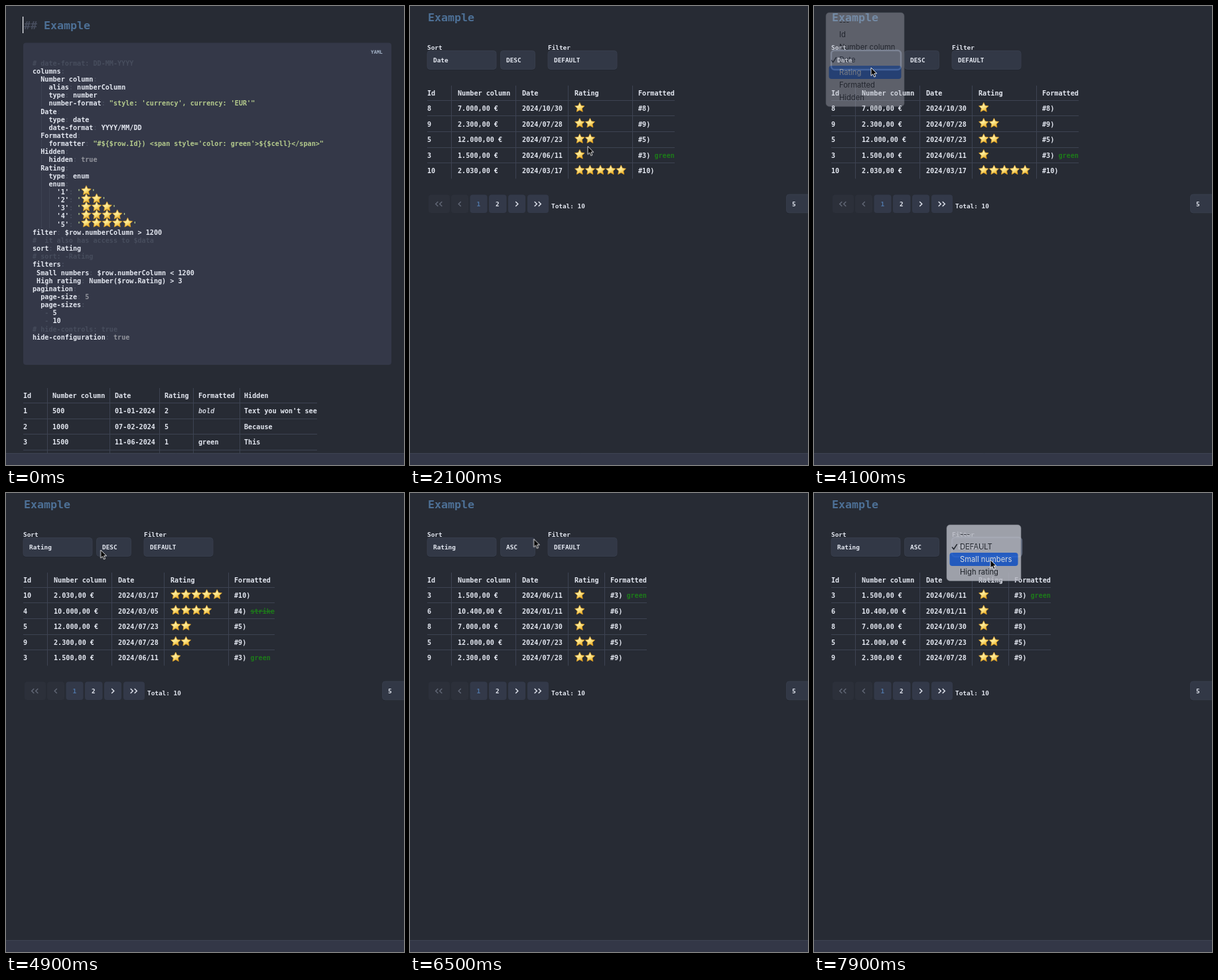
Recreate the animation shown at these times as an HTML page. Size 600x692 px, loop 8 s.

```html
<!DOCTYPE html>
<html lang="en">
<head>
<meta charset="utf-8">
<title>Sortable table demo</title>
<style>
html, body { margin: 0; width: 100%; height: 100%; overflow: hidden; background: #272b34; }
svg { display: block; }
text { white-space: pre; font: bold 10.13px "DejaVu Sans Mono", monospace; fill: #e3e7f0; }
.title { font-size: 16.6px; fill: #4d7096; }
.ui { font-size: 9.4px; }
.tiny { font-size: 7.4px; fill: #a5b4c9; }
.dim { fill: #474d5d; }
.str { fill: #b4ca8c; }
.lit { fill: #92949c; }
.blue { fill: #4f77a8; }
.ok { fill: #1d7a1a; }
.strike { text-decoration: line-through; }
.em { font-style: italic; fill: #c8ccd6; }
.rule { stroke: #3d4352; fill: none; }
.chev { stroke: #e3e7f0; stroke-width: 1.4; fill: none; }
.chev.off { stroke: #626877; }
.menu text { font: 11.2px Inter, "Liberation Sans", sans-serif; fill: #1b1e25; }
.menu .hl text { fill: #fff; }
.menu path { fill: none; stroke: #1b1e25; stroke-width: 1.5; }
.menu .hl path { stroke: #fff; }
.timed { animation: 8s linear infinite; opacity: 0; }
#pointer { animation: glide 8s ease-in-out infinite; }
@keyframes glide {
  0%, 21.2% { transform: translate(446px, 342px); opacity: 0; animation-timing-function: step-end; }
  21.21% { transform: translate(446px, 342px); opacity: 1; }
  31.25% { transform: translate(94px, 84px); }
  35%, 40% { transform: translate(98px, 86px); }
  49%, 55% { transform: translate(86px, 93px); }
  65%, 67.5% { transform: translate(166px, 83px); }
  72.3%, 78.75% { transform: translate(175px, 68px); }
  88.75%, 91.3% { transform: translate(264px, 79px); }
  97%, 100% { transform: translate(266px, 101px); opacity: 1; }
}
</style>
</head>
<body>
<svg id="stage" width="600" height="692" viewBox="0 0 600 692">
  <defs>
    <linearGradient id="gold" x1="0" y1="0" x2=".6" y2="1">
      <stop offset=".15" stop-color="#fff8c4"/>
      <stop offset=".6" stop-color="#fbe487"/>
      <stop offset="1" stop-color="#efaf22"/>
    </linearGradient>
    <path id="star" fill="url(#gold)" stroke="#dfa024" stroke-width=".8" stroke-linejoin="round"/>
  </defs>
</svg>
<script>
const LOOP = 8000, CHAR = 6.1, STAR = 15.6;
const stage = document.getElementById('stage');
const esc = s => s.replace(/&/g, '&amp;').replace(/</g, '&lt;');
const text = (x, y, s, cls = '') => `<text x="${x}" y="${y + 3.7}" class="${cls}">${s}</text>`;
const span = (s, cls) => `<tspan class="${cls}">${esc(s)}</tspan>`;
const rect = (x, y, w, h, fill, r = 4, more = '') =>
  `<rect x="${x}" y="${y}" width="${w}" height="${h}" rx="${r}" fill="${fill}" ${more}/>`;
const rule = d => `<path class="rule" d="${d}"/>`;
const snap = v => Math.floor(v) + .5;
const stars = (x, y, n) => Array.from({ length: n }, (_, i) =>
  `<use href="#star" x="${x + STAR * (i + .5)}" y="${y - 1}"/>`).join('');

// Timed groups: visible from `on` to `off` ms, optionally fading out over `fade` ms.
let rules = '', count = 0;
function timed(on, off, body, fade = 0) {
  const name = 'span' + count++, pct = ms => (ms - 6) / LOOP * 100 + '%';
  const hard = 'animation-timing-function:step-end';
  const start = on ? `0%{opacity:0;${hard}}${pct(on)}` : '0%';
  let end = '100%{opacity:1}';
  if (off + fade > LOOP) {
    end = `${pct(off)}{opacity:1}100%{opacity:${1 - (LOOP - off) / fade}}`;
  } else if (off < LOOP) {
    end = `${pct(off)}{opacity:${fade ? 1 : 0}}${pct(off + fade)}{opacity:0}100%{opacity:0}`;
  }
  rules += `@keyframes ${name}{${start}{opacity:1;${fade ? 'animation-timing-function:linear' : hard}}${end}}`;
  return `<g class="timed" style="animation-name:${name}">${body}</g>`;
}

function table(cols, lines, right, top, head, rows) {
  const pitch = 23.6, headY = top + 11;
  const rowY = i => headY + 23.2 + pitch * i;
  let out = cols.map((x, c) => text(x, headY, head[c])).join('');
  rows.forEach((row, i) => {
    const y = rowY(i);
    out += rule(`M26 ${snap(y - 11.8)}H${right}`);
    out += row.map((v, c) => typeof v === 'number' ? stars(cols[c], y, v) : text(cols[c], y, v)).join('');
  });
  const bottom = rowY(rows.length - 1) + 11.8;
  return out + lines.map(x => rule(`M${x + .5} ${top}V${bottom}`)).join('');
}

// Editor view
const yaml = `# date-format: DD-MM-YYYY
columns:
  Number column:
    alias: numberColumn
    type: number
    number-format: "style: 'currency', currency: 'EUR'"
  Date:
    type: date
    date-format: YYYY/MM/DD
  Formatted:
    formatter: "#\${$row.Id}) <span style='color: green'>\${$cell}</span>"
  Hidden:
    hidden: true
  Rating:
    type: enum
    enum:
      '1': *
      '2': *
      '3': *
      '4': *
      '5': *
filter: $row.numberColumn > 1200
#  it also has access to $data
sort: Rating
# sort: -Rating
filters:
 Small numbers: $row.numberColumn < 1200
 High rating: Number($row.Rating) > 3
pagination:
  page-size: 5
  page-sizes:
   - 5
   - 10
# hide-controls: true
hide-configuration: true`.split('\n');

function codeLine(line, i) {
  const x = 40, y = 86 + i * 12.147;
  if (line[0] === '#') return text(x, y, esc(line), 'dim');
  if (line.includes('- ')) return text(x, y, line.replace('-', span('-', 'dim')));
  const [, key, value] = line.match(/^([^:]*):(.*)$/);
  const lead = esc(key) + span(':', 'dim');
  if (value === ' *') {
    const n = +key.match(/\d/)[0], sx = x + 12 * CHAR;
    return text(x, y, lead + span(" '", 'str')) + stars(sx, y - 1, n) + text(sx + n * STAR, y, "'", 'str');
  }
  const cls = value[1] === '"' ? 'str' : /^ (true|\d+)$/.test(value) ? 'lit' : '';
  return text(x, y, lead + span(value, cls));
}

const guides = [[53, 116, 152], [53, 165, 189], [53, 201, 213], [53, 225, 237], [53, 250, 335], [65, 274, 335]];
const editor =
  text(27, 31, span('## ', 'dim') + 'Example', 'title') +
  rect(25, 16, 1.2, 25, '#f4f6fa', 0) +
  rect(26, 55.5, 555, 485.5, '#343848') +
  text(550, 68, 'YAML', 'tiny') +
  guides.map(([x, a, b]) => rule(`M${x + .5} ${a}V${b}`)).join('') +
  yaml.map(codeLine).join('') +
  table([26, 70, 164, 239, 290, 359], [62, 156, 231, 282, 352], 469, 576,
    ['Id', 'Number column', 'Date', 'Rating', 'Formatted', 'Hidden'], [
      ['1', '500', '01-01-2024', '2', span('bold', 'em'), "Text you won't see"],
      ['2', '1000', '07-02-2024', '5', '', 'Because'],
      ['3', '1500', '11-06-2024', '1', 'green', 'This'],
      []
    ]);

// Rendered view
const box = (x, y, w) => rect(x, y + 1, w, 28, '#20242c') + rect(x, y, w, 28, '#323846', 4, 'stroke="#3a4150" stroke-width=".8"');
const ring = (x, w) => rect(x, 67, w, 29, 'none', 5, 'stroke="#5a6478" stroke-width="2.4"');
const chevron = (x, dir, off) =>
  `<path class="chev ${off ? 'off' : ''}" d="M${x - 1.8 * dir} 295l${3.6 * dir} 3.5l${-3.6 * dir} 3.5"/>`;
const button = (x, w, off) => rect(x, 284.5, w, 27.5, off ? '#2c303a' : '#333949', 4);

const page =
  text(27, 19, 'Example', 'title') +
  text(26, 62, 'Sort', 'ui') + text(208, 62, 'Filter', 'ui') +
  box(26, 67.5, 104) + box(136.5, 67.5, 52) + box(208, 67.5, 104) +
  text(217, 81, 'DEFAULT', 'ui') +
  button(28, 32, 1) + chevron(40.5, -1, 1) + chevron(46.5, -1, 1) +
  button(62, 26, 1) + chevron(75, -1, 1) +
  button(90.5, 26) + text(100.5, 298.5, '1', 'ui blue') +
  button(119, 26.5) + text(129, 298.5, '2', 'ui') +
  button(148, 26) + chevron(161, 1) +
  button(177, 32) + chevron(189.5, 1) + chevron(195.5, 1) +
  text(213, 301, 'Total: 10', 'ui') +
  box(567.5, 284, 60) + text(576, 298, '5', 'ui');

const records = {
  3: ['1.500,00 €', '2024/06/11', 1, span('green', 'ok')],
  4: ['10.000,00 €', '2024/03/05', 4, span('strike', 'ok strike')],
  5: ['12.000,00 €', '2024/07/23', 2, ''],
  6: ['10.400,00 €', '2024/01/11', 1, ''],
  8: ['7.000,00 €', '2024/10/30', 1, ''],
  9: ['2.300,00 €', '2024/07/28', 2, ''],
  10: ['2.030,00 €', '2024/03/17', 5, '']
};
function sorted(by, order, ids, lastLine, right) {
  const rows = ids.map(id => {
    const [amount, date, rating, note] = records[id];
    return [String(id), amount, date, rating, `#${id}) ${note}`];
  });
  return text(35, 81, by, 'ui') + text(145, 81, order, 'ui') +
    table([26, 72, 169, 248, lastLine + 9], [62, 159, 238, lastLine], right, 120,
      ['Id', 'Number column', 'Date', 'Rating', 'Formatted'], rows);
}

// Native drop-down: `picked` and `next` are highlighted in turn, `check` is ticked.
function menu(x, y, w, items, check, [picked, next], [on, swap, off]) {
  const itemY = i => y + 14 + 19 * i;
  const item = (s, i) => text(x + 20, itemY(i) + .3, s) +
    (i === check ? `<path d="M${x + 8} ${itemY(i) + .5}l2.7 3.2l5 -7.6"/>` : '');
  const lit = i => `<g class="hl">${rect(x + 4.5, itemY(i) - 10, w - 9, 20, '#2364d8')}${item(items[i], i)}</g>`;
  const body = rect(x, y, w, items.length * 19 + 8.5, '#b4b7c0', 5, 'stroke="#8b8f99" stroke-width=".6"') +
    items.map(item).join('') +
    timed(on, swap, lit(picked)) + timed(swap, LOOP, lit(next));
  return `<g class="menu">${timed(on, off, body, 150)}</g>`;
}

const point = (_, i) => {
  const r = i % 2 ? 3.7 : 7.6, a = (i / 5 - .5) * Math.PI;
  return `${(r * Math.cos(a)).toFixed(2)} ${(r * Math.sin(a)).toFixed(2)}`;
};
document.getElementById('star').setAttribute('d', 'M' + Array.from({ length: 10 }, point).join('L') + 'Z');

stage.innerHTML +=
  timed(0, 100, editor) +
  timed(100, LOOP, page) +
  timed(2700, 4200, ring(26, 105)) +
  timed(5350, 6300, ring(136, 54)) +
  timed(7200, LOOP, ring(208, 105)) +
  timed(100, 4200, sorted('Date', 'DESC', [8, 9, 5, 3, 10], 335, 399)) +
  timed(4200, 6300, sorted('Rating', 'DESC', [10, 4, 5, 9, 3], 335, 405)) +
  timed(6300, LOOP, sorted('Rating', 'ASC', [3, 6, 8, 5, 9], 293, 357)) +
  rect(0, 674, 600, 18, '#333747', 0) + rule('M0 674.5H600') +
  menu(18, 10, 118, ['---', 'Id', 'Number column', 'Date', 'Rating', 'Formatted', 'Hidden'], 3, [3, 4], [2700, 3600, 4015]) +
  menu(128, 48, 64, ['ASC', 'DESC'], 1, [1, 0], [5350, 5620, 6140]) +
  menu(200, 48, 112, ['---', 'DEFAULT', 'Small numbers', 'High rating'], 1, [1, 2], [7200, 7550, 7882]) +
  `<path id="pointer" d="M0 0V12.2L2.8 9.6L4.8 14L6.9 13.1L4.9 8.8H8.8Z" fill="#000" stroke="#fff" stroke-width=".9"/>`;

const sheet = document.createElement('style');
sheet.textContent = rules;
document.head.append(sheet);
</script>
</body>
</html>
```
